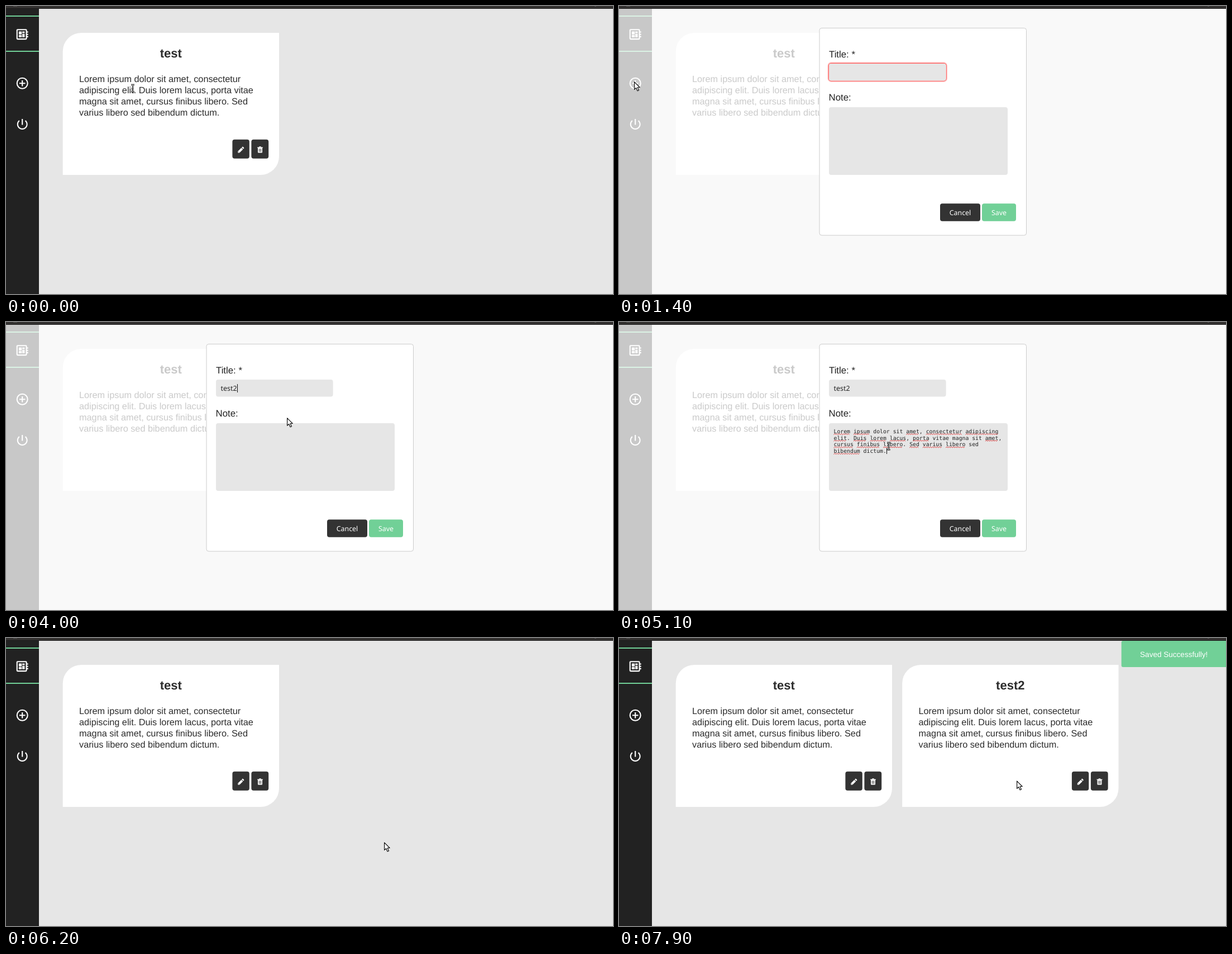
An HTML page that plays this animation: 1087x515 px, repeating every 8000 ms.

```html
<!DOCTYPE html>
<html lang="en">
<head>
<meta charset="utf-8">
<title>Notes</title>
<style>
html, body { margin: 0; width: 100%; height: 100%; overflow: hidden; background: #e6e6e6; }
svg { display: block; width: 1087px; height: 515px; }
text { white-space: pre; text-rendering: geometricPrecision; }
.body { font: 16.27px "Liberation Sans", Arial, sans-serif; fill: #2c2c2c; }
.head { font: bold 22px "Liberation Sans", Arial, sans-serif; fill: #2c2c2c; text-anchor: middle; }
.label { font: 16.8px "Liberation Sans", Arial, sans-serif; fill: #222; }
.toast { font: 13.55px "Liberation Sans", Arial, sans-serif; fill: #fff; text-anchor: middle; }
.ui { font: 12.4px "Noto Sans", "Open Sans", sans-serif; fill: #222; }
.mid { text-anchor: middle; fill: #fff; }
.mono { font: 9.8px "DejaVu Sans Mono", monospace; fill: #222; }
.squiggle { fill: none; stroke: #e03030; stroke-width: .9; }
</style>
</head>
<body>
<svg viewBox="0 0 1087 515">
  <defs>
    <g id="arrow">
      <path d="M.6.8V14.2L3.7 11.4 6.1 16.8 8.5 15.7 6.1 10.5H10.2Z" fill="#fff" stroke="#111" stroke-width="1.2" stroke-linejoin="round"/>
    </g>
    <path id="beamShape" d="M-2.8-6.3H-1.5Q0-6.3 0-5Q0-6.3 1.5-6.3H2.8M0-5V5M-2.8 6.3H-1.5Q0 6.3 0 5Q0 6.3 1.5 6.3H2.8" fill="none"/>
    <g id="beam">
      <use href="#beamShape" stroke="#111" stroke-width="2.6"/>
      <use href="#beamShape" stroke="#fff" stroke-width=".8"/>
    </g>
    <g id="hand">
      <path d="M-1.5 8V1Q0-.7 1.5 1V5L8 6.2Q9.5 6.6 9.2 8.5L8 13.5H0L-4.6 8.2Q-4-.0 -1.5 8Z" fill="#fff" stroke="#111" stroke-width="1.1" stroke-linejoin="round"/>
    </g>
    <g id="pencil" fill="#fff">
      <path d="M0 8.2V11H2.8L9 4.8 6.2 2ZM6.9 1.3 9.7 4.1 10.8 3Q11.3 2.4 10.8 1.8L9.2.2Q8.6-.3 8 .2Z"/>
      <path d="M1.3 8.6 2.4 9.7" stroke="#333"/>
    </g>
    <g id="bin">
      <path d="M0 2H3L3.6.5H6.4L7 2H10V3.2H9V11Q9 12 8 12H2Q1 12 1 11V3.2H0ZM4 2H6L5.7 1.4H4.3Z" fill="#fff" fill-rule="evenodd"/>
      <path d="M3.2 4.6V10.2M5 4.6V10.2M6.8 4.6V10.2" stroke="#333" stroke-width=".8"/>
    </g>
  </defs>

  <rect width="1087" height="515" fill="#e6e6e6"/>
  <rect width="59" height="515" fill="#222"/>
  <rect id="hover" y="107" width="59" height="60" fill="#71d097"/>
  <path d="M0 18H59M0 81H59" stroke="#71d097" stroke-width="2"/>
  <g fill="#fff">
    <path transform="translate(16.6 38.1) scale(1.05)" d="M22 9V7h-2V5c0-1.1-.9-2-2-2H4c-1.1 0-2 .9-2 2v14c0 1.1.9 2 2 2h14c1.1 0 2-.9 2-2v-2h2v-2h-2v-2h2v-2h-2V9h2zm-4 10H4V5h14v14zM6 13h5v4H6zm6-6h4v3h-4zM6 7h5v5H6zm6 4h4v6h-4z"/>
    <path transform="translate(16.6 198.9) scale(1.05)" d="M13 3h-2v10h2V3zm4.83 2.17l-1.42 1.42C17.99 7.86 19 9.81 19 12c0 3.87-3.13 7-7 7s-7-3.13-7-7c0-2.19 1.01-4.14 2.58-5.42L6.17 5.17C4.23 6.82 3 9.26 3 12c0 4.97 4.03 9 9 9s9-4.03 9-9c0-2.74-1.23-5.18-3.17-6.83z"/>
  </g>
  <g fill="none" stroke="#fff" stroke-width="2.1">
    <circle cx="29.2" cy="138.3" r="9.5"/>
    <path d="M29.2 133V143.6M23.9 138.3H34.5"/>
  </g>

  <g id="cardA"></g>
  <g id="cardB" transform="translate(405.5 0)"></g>

  <g id="toast">
    <path d="M1087 5H902.7Q899.7 5 899.7 8V49Q899.7 52 902.7 52H1087Z" fill="#71d097"/>
    <text class="toast" x="993.7" y="33.8">Saved Successfully!</text>
  </g>

  <g id="modal">
    <rect width="1087" height="515" fill="#fff" fill-opacity=".75"/>
    <rect x="359" y="39.5" width="370.5" height="370.5" rx="4" fill="#fff" stroke="#ccc"/>
    <text class="label" x="376" y="92">Title: *</text>
    <text class="label" x="375.6" y="169">Note:</text>
    <g id="invalid" fill="none" stroke="#f00">
      <rect x="374.7" y="101.7" width="212" height="33" rx="5" stroke-width="2.4" stroke-opacity=".25"/>
      <rect x="375.4" y="102.4" width="210.8" height="31.6" rx="4.5" stroke-opacity=".6"/>
    </g>
    <rect x="376" y="103" width="209.6" height="30.6" rx="4" fill="#e6e6e6"/>
    <rect x="376" y="181" width="320" height="121" rx="4" fill="#e6e6e6"/>
    <text id="title" class="ui" x="384.6" y="123"></text>
    <g id="note"></g>
    <rect id="caret" width="1" fill="#111"/>
    <rect x="575" y="353.3" width="72" height="31.4" rx="4" fill="#333"/>
    <rect x="650" y="353.3" width="61" height="31.4" rx="4" fill="#71d097"/>
    <text class="ui mid" x="611" y="373.8">Cancel</text>
    <text class="ui mid" x="680.5" y="373.8">Save</text>
    <g id="tip">
      <rect x="395" y="130" width="195" height="25" rx="4" fill="#2b2b2b"/>
      <text class="ui mid" x="492.5" y="147">Please fill out this field.</text>
    </g>
  </g>

  <rect width="1087" height="5" fill="#333130"/>
  <rect y="4" width="1087" height="1" fill="#1b1a1a"/>
  <path d="M13 .3H20M1054 .3H1057" stroke="#666" stroke-width=".8"/>

  <use id="cursor"/>
</svg>
<script>
const LOOP = 8000, STEP = 100;
const el = id => document.getElementById(id);
const show = (id, on) => el(id).setAttribute("visibility", on ? "inherit" : "hidden");

const cardLines = [
  "Lorem ipsum dolor sit amet, consectetur",
  "adipiscing elit. Duis lorem lacus, porta vitae",
  "magna sit amet, cursus finibus libero. Sed",
  "varius libero sed bibendum dictum."
];
const noteLines = [
  "Lorem ipsum dolor sit amet, consectetur adipiscing",
  "elit. Duis lorem lacus, porta vitae magna sit amet,",
  "cursus finibus libero. Sed varius libero sed",
  "bibendum dictum."
];
const knownWords = ["dolor", "sit", "vitae", "magna", "sed", "dictum"];

function card(title) {
  const lines = cardLines.map((s, i) =>
    `<text class="body" x="131" y="${135.8 + i * 20.2}">${s}</text>`).join("");
  return `<path d="M101.7 302V81A33 33 0 0 1 134.7 48H489V269A33 33 0 0 1 456 302Z" fill="#fff"/>
    <text class="head" x="295.3" y="92">${title}</text>${lines}
    <rect x="405.4" y="238.8" width="30.4" height="34" rx="4" fill="#333"/>
    <rect x="439.4" y="238.8" width="30.8" height="34" rx="4" fill="#333"/>
    <use href="#pencil" x="415.3" y="251.6"/><use href="#bin" x="450" y="250.6"/>`;
}

function noteLine(line, row) {
  const advance = 5.9, left = 384.5, y = 198.8 + row * 11.7;
  let out = `<text class="mono" x="${left}" y="${y}">${line}</text>`;
  for (const m of line.matchAll(/\w+/g)) {
    if (knownWords.includes(m[0])) continue;
    const start = left + m.index * advance, width = m[0].length * advance;
    let d = `M${start} ${y + 2.6}`;
    for (let x = 2, up = 1; x <= width; x += 2, up ^= 1) d += `L${start + x} ${y + 2.6 - up * 1.6}`;
    out += `<path class="squiggle" d="${d}"/>`;
  }
  return out;
}

el("cardA").innerHTML = card("test");
el("cardB").innerHTML = card("test2");
el("note").innerHTML = noteLines.map(noteLine).join("");

// Pointer path: time, x, y
const path = [
  [200, 227, 147], [400, 205, 172], [600, 145, 200], [700, 110, 202], [900, 52, 164], [1100, 27, 135],
  [1400, 27, 135], [1600, 170, 140], [1800, 370, 122], [1900, 397, 114],
  [2900, 397, 114], [3200, 415, 150], [3400, 450, 158], [3600, 500, 151], [3800, 518, 152],
  [3900, 518, 152], [4100, 488, 190], [4300, 456, 213], [4400, 456, 213], [4500, 457, 213],
  [4900, 457, 213], [5100, 483, 222], [5400, 600, 285], [5600, 676, 338], [5800, 680, 362], [5900, 677, 365],
  [6500, 677, 365], [6700, 692, 300], [6900, 674, 190], [7100, 658, 90], [7200, 672, 76],
  [7400, 662, 96], [7600, 608, 165], [7700, 628, 215], [7900, 712, 255]
];

function pointer(t) {
  const i = path.findIndex(p => p[0] > t);
  if (i === 0) return path[0].slice(1);
  if (i < 0) return path[path.length - 1].slice(1);
  const [a, b] = [path[i - 1], path[i]], k = (t - a[0]) / (b[0] - a[0]);
  return [1, 2].map(n => Math.round(a[n] + (b[n] - a[n]) * k));
}

const inside = (x, y, l, t, r, b) => x >= l && x <= r && y >= t && y <= b;

function cursorShape(x, y, modal, second) {
  if (modal) {
    if (inside(x, y, 376, 103, 586, 134) || inside(x, y, 376, 181, 696, 302)) return "beam";
    return inside(x, y, 575, 353, 711, 385) ? "hand" : "arrow";
  }
  const overText = left => inside(x, y, left, 71, left + 328, 97) || inside(x, y, left, 120, left + 328, 201);
  return overText(131) || second && overText(536.5) ? "beam" : "arrow";
}

function typedTitle(t) {
  const count = t < 2800 ? 0 : t < 2900 ? 2 : t < 3000 ? 3 : t < 3700 ? 4 : 5;
  return "test2".slice(0, count);
}

function placeCaret(t) {
  const inTitle = t < 4300, pasted = t >= 5000;
  const x = inTitle ? 385 + el("title").getComputedTextLength() : pasted ? 479 : 384.5;
  el("caret").setAttribute("x", Math.round(x));
  el("caret").setAttribute("y", inTitle ? 111 : pasted ? 225 : 190);
  el("caret").setAttribute("height", inTitle ? 15 : 11);
}

function draw(t) {
  const modal = t >= 1400 && t < 6100, saved = t >= 6300;
  const [x, y] = pointer(t);
  show("hover", !modal && inside(x, y, 0, 107, 59, 167));
  show("modal", modal);
  show("cardB", saved);
  show("toast", saved);
  show("invalid", t < 2800);
  show("tip", t >= 2600 && t < 2800);
  show("note", t >= 5000);
  show("caret", t >= 2100);
  el("title").textContent = typedTitle(t);
  placeCaret(t);
  el("cursor").setAttribute("href", "#" + cursorShape(x, y, modal, saved));
  el("cursor").setAttribute("transform", `translate(${x} ${y})`);
}

const start = performance.now();
function tick() {
  const t = (performance.now() - start) % LOOP;
  draw(Math.floor(t / STEP) * STEP);
  requestAnimationFrame(tick);
}
tick();
</script>
</body>
</html>
```
